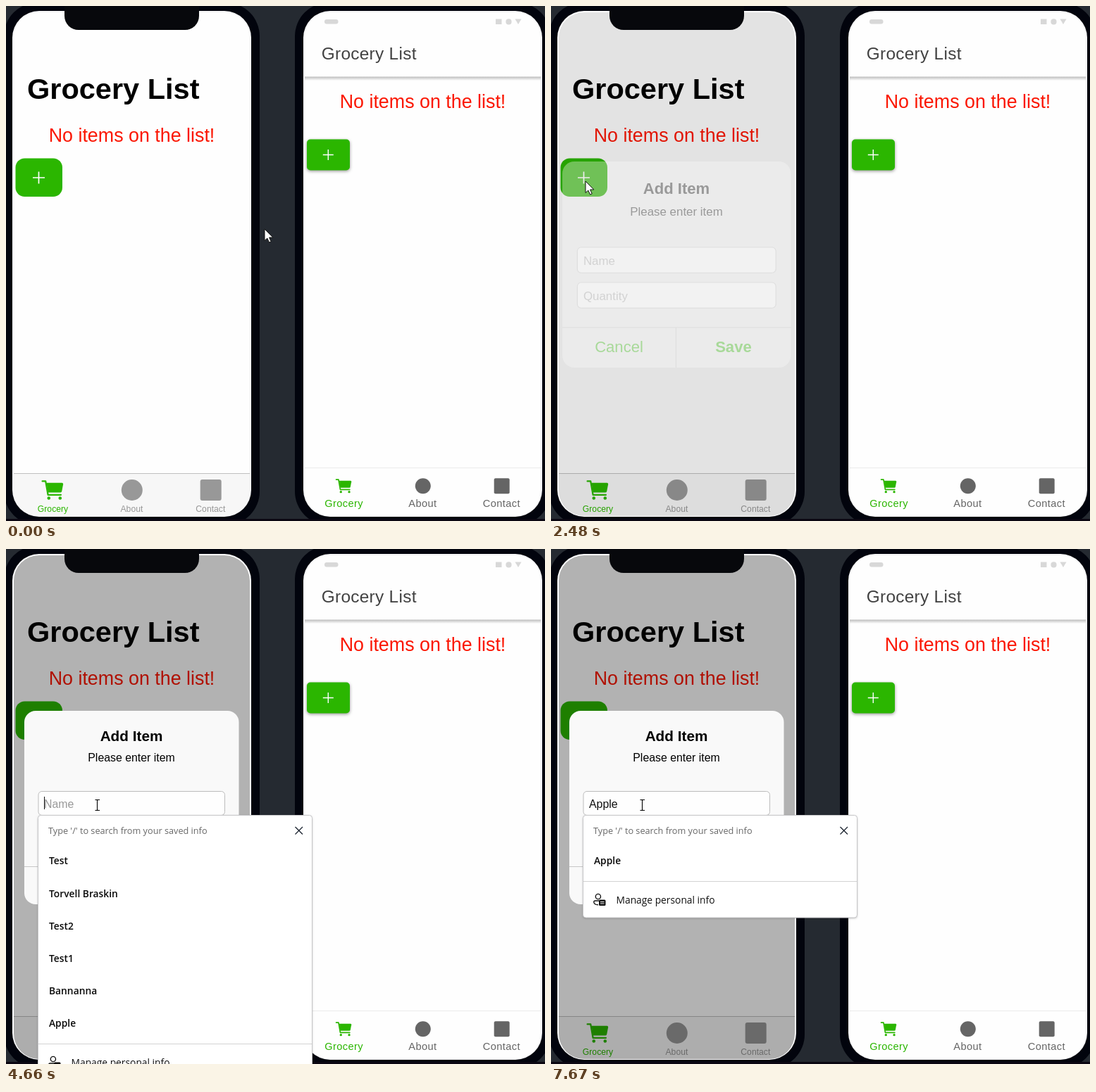
An HTML page with a canvas for the animation above (8000 ms loop, 765 by 732 pixels).

```html
<!DOCTYPE html>
<html lang="en">
<head>
<meta charset="utf-8">
<title>Grocery list on two phones</title>
<style>
html, body { margin: 0; width: 100%; height: 100%; overflow: hidden; background: #252a31; }
canvas { display: block; width: 765px; height: 732px; }
</style>
</head>
<body>
<canvas id="stage" width="765" height="732"></canvas>
<script>
const c = document.getElementById('stage').getContext('2d');
const LOOP = 8000;
const SANS = '"Liberation Sans", Arial, sans-serif';
const UI = '"Open Sans", "Noto Sans", sans-serif';
const GREEN = '#2bb600', BLUE = '#4c8dff', RED = '#fb1703';

// Pointer moves: start, end, steps, target x, target y
const MOVES = [
  [70, 190, 2, 383, 299],
  [670, 1300, 9, 54, 250.5],
  [1530, 1530, 1, 46, 242],
  [1615, 1615, 1, 39, 235],
  [1700, 1700, 1, 49, 249],
  [2870, 3180, 5, 142, 368],
  [3250, 3330, 2, 130, 364]
];
const TYPED = [4910, 5440, 5610, 5930, 6010];
const SAVED = ['Test', 'Torvell Braskin', 'Test2', 'Test1', 'Bannanna', 'Apple'];

const ease = p => p * p * p * (p * (6 * p - 15) + 10);
const between = (v, a, b) => v >= a && v < b;

function rect(x, y, w, h, r, fill, stroke) {
  c.beginPath();
  c.roundRect(x, y, w, h, r);
  if (fill) { c.fillStyle = fill; c.fill(); }
  if (stroke) { c.strokeStyle = stroke; c.lineWidth = 1; c.stroke(); }
}

function disc(x, y, r, fill) {
  c.beginPath();
  c.arc(x, y, r, 0, 7);
  c.fillStyle = fill;
  c.fill();
}

function path(d, fill, stroke, width = 1) {
  const p = new Path2D(d);
  c.lineWidth = width;
  if (fill) { c.fillStyle = fill; c.fill(p); }
  if (stroke) { c.strokeStyle = stroke; c.stroke(p); }
}

function text(s, x, y, size, fill, { weight = 400, align = 'left', gap = 0, font = SANS } = {}) {
  c.font = `${weight} ${size}px ${font}`;
  c.textAlign = align;
  c.letterSpacing = gap + 'px';
  c.fillStyle = fill;
  c.fillText(s, x, y);
}

function place(x, y, scale, draw) {
  c.save();
  c.translate(x, y);
  c.scale(scale, scale);
  draw();
  c.restore();
}

function plus(x, y, r, w) {
  path(`M${x - r} ${y}H${x + r}M${x} ${y - r}V${y + r}`, null, '#fff', w);
}

function cart(x, y, size) {
  place(x - size / 2, y - size / 2, size / 512, () => {
    c.lineJoin = c.lineCap = 'round';
    path('M48 80H112L160 352H416', null, GREEN, 32);
    path('M130 112H440Q465 115 461 141L433 285Q429 303 409 304H160Z', GREEN);
    disc(176, 416, 32, GREEN);
    disc(400, 416, 32, GREEN);
  });
}

function frame(x) {
  rect(x - 12, -5, 363, 743, 48, '#02040d');
  rect(x, 7, 339, 719, 38, '#fefefe');
}

function tabs(x, iconY, size, labelY, labelSize, gap, grey) {
  const half = size * 0.41;
  cart(x, iconY, size);
  disc(x + 112.3, iconY, half, grey);
  rect(x + 224.2 - half, iconY - half, half * 2, half * 2, size * 0.08, grey);
  ['Grocery', 'About', 'Contact'].forEach((s, i) =>
    text(s, x + i * 111.9, labelY, labelSize, i ? grey : GREEN, { align: 'center', gap }));
}

function leftPhone(hover, shade) {
  frame(9);
  c.save();
  c.beginPath();
  c.roundRect(11, 9, 335, 716, 36);
  c.clip();
  c.fillStyle = '#f7f7f7';
  c.fillRect(11, 664, 335, 62);
  c.fillStyle = '#c0c0c0';
  c.fillRect(11, 664, 335, 1);
  tabs(66.5, 688, 36.6, 719, 12.2, 0, '#989898');
  text('Grocery List', 30, 132, 41.5, '#000', { weight: 700 });
  text('No items on the list!', 178.5, 193, 26.84, RED, { align: 'center' });
  rect(13.5, 216.5, 66.5, 54.5, 13, hover ? BLUE : GREEN);
  plus(46.5, 244, 8.5, 1.7);
  c.fillStyle = `rgba(0,0,0,${shade})`;
  c.fillRect(11, 9, 335, 716);
  c.restore();
  if (!shade) rect(10.5, 8.5, 336, 717, 36, null, 'rgba(0,0,0,.05)');
  rect(83, 0, 191, 34, [0, 0, 20, 20], '#07080c');
}

function rightPhone() {
  frame(422);
  rect(423.5, 8.5, 336, 717, 36, null, 'rgba(0,0,0,.05)');
  const grey = '#d8d8d8';
  rect(452, 19, 19.5, 6.5, 3.2, grey);
  rect(695, 18.5, 8.5, 7.5, 0, grey);
  disc(713.5, 22.4, 4.1, grey);
  path('M722.5 18.5H731.5L727 26Z', grey);
  text('Grocery List', 447.7, 76, 24.4, '#424242', { gap: 0.3 });
  const g = c.createLinearGradient(0, 100, 0, 106);
  g.addColorStop(0, 'rgba(0,0,0,.3)');
  g.addColorStop(0.35, 'rgba(0,0,0,.18)');
  g.addColorStop(1, 'rgba(0,0,0,0)');
  c.fillStyle = g;
  c.fillRect(424, 100.5, 335, 5.5);
  text('No items on the list!', 591.5, 145, 26.84, RED, { align: 'center' });
  c.save();
  c.shadowColor = 'rgba(0,0,0,.4)';
  c.shadowBlur = 4;
  c.shadowOffsetY = 1.5;
  rect(427, 189.5, 61, 44, 5, GREEN);
  c.restore();
  plus(457.3, 211.5, 7.5, 1.4);
  c.fillStyle = '#ebebeb';
  c.fillRect(424, 656, 335, 1);
  tabs(479.5, 682.3, 26.84, 711.5, 14.6, 0.4, '#656565');
}

function field(y, hint, value) {
  rect(46, y, 264.5, 34, 5, '#fefefe', '#bcbcbc');
  text(value || hint, 54, y + 23, 15.86, value ? '#111' : '#999');
}

function dialog(p, value) {
  const mid = { align: 'center' }, bold = { align: 'center', weight: 700 };
  c.save();
  c.globalAlpha = p;
  place(178.25, 367.5, 1.1 - 0.1 * p, () => {
    c.translate(-178.25, -367.5);
    rect(26, 230, 304.5, 275, 16, '#f9f9f9');
    text('Add Item', 178, 273, 20.74, '#000', bold);
    text('Please enter item', 178, 302, 15.86, '#000', mid);
    field(344.5, 'Name', value);
    field(391.5, 'Quantity');
    c.fillStyle = '#c6c6c6';
    c.fillRect(26, 451, 304.5, 1);
    c.fillRect(177, 452, 1, 53);
    text('Cancel', 101.5, 484.5, 20.74, GREEN, mid);
    text('Save', 254, 484.5, 20.74, GREEN, bold);
  });
  c.restore();
}

function suggestions(items) {
  const line = 472 + (items.length - 1) * 46.2;
  c.save();
  c.shadowColor = 'rgba(0,0,0,.25)';
  c.shadowBlur = 3;
  c.shadowOffsetY = 1;
  rect(45.5, 378.5, 389, line - 326.5, 4, '#fff');
  c.restore();
  rect(45.5, 378.5, 389, line - 326.5, 4, null, '#c6c6c8');
  text("Type '/' to search from your saved info", 60, 405, 12.7, '#686868', { font: UI });
  path('M410.5 395L421 405.5M421 395L410.5 405.5', null, '#1c2430', 1.3);
  items.forEach((s, i) => text(s, 61, 448.3 + i * 46.2, 13.8, '#0a0a0a', { font: UI, weight: 600 }));
  c.fillStyle = '#d2d2d2';
  c.fillRect(46, Math.round(line), 388, 1);
  place(60, line + 18, 1, () => {
    path('M10.5 4A3.6 3.6 0 1 1 3.3 4A3.6 3.6 0 1 1 10.5 4M8 10H2.5Q.8 10 .8 12Q1.2 15.5 7 15.8', null, '#111', 1.4);
    rect(8, 8.5, 9.5, 8.5, 1.5, '#111');
    path('M10 11.5H15.5M10 14H15.5', null, '#fff', 1.1);
  });
  text('Manage personal info', 92.5, line + 32.3, 13.8, '#111', { font: UI });
}

function pointerAt(t) {
  let x = 367, y = 317;
  for (const [a, b, n, tx, ty] of MOVES) {
    if (t < a) break;
    const gap = (b - a) / (n - 1) || 1;
    const k = Math.min(n, 1 + Math.floor((t - a) / gap + 0.1));
    const p = ease(k / n);
    x += (tx - x) * p;
    y += (ty - y) * p;
  }
  return [x, y];
}

function pointer(x, y, kind) {
  place(x, y, 1, () => {
    c.lineJoin = 'round';
    c.lineCap = 'butt';
    if (kind === 'hand') {
      path('M-2 1.5Q0-1 2 1.5V7Q4 5.8 5 7.8Q7 6.8 8 8.8Q10.5 8 10.5 11V15L8.5 18.5V21.5H-1V18.5L-5 13Q-5.6 10-3.5 10.6L-2 12.5Z', '#fff', '#000', 1.1);
      path('M2 7V11M5 8V11.5M8 9V12', null, '#000', 0.9);
    } else if (kind === 'beam') {
      path('M-3.5-7.5H-1L-.5-7L0-7.5H3M-3.5 7.5H-1L-.5 7L0 7.5H3M-.5-7V7', null, '#000', 1.1);
    } else {
      path('M0 0V16.5L3.8 13L6.5 19L9.2 17.8L6.6 12H11.8Z', '#fff', '#111');
    }
  });
}

function render(t) {
  const [x, y] = pointerAt(t);
  const open = t < 2390 ? 0 : t < 2480 ? 0.01 : t < 2560 ? 0.35 : t < 2630 ? 0.93 : 1;
  const hover = !open && between(x, 14, 80) && between(y, 217, 271);
  const value = 'Apple'.slice(0, TYPED.filter(k => t >= k).length);

  c.fillStyle = '#252a31';
  c.fillRect(0, 0, 765, 732);
  leftPhone(hover, 0.3 * open);
  rightPhone();
  c.fillStyle = '#0b0712';
  c.fillRect(0, 729, 765, 3);

  if (open) dialog(open, value);
  const caret = t >= 3570 && !between(t, 4130, 4660) && !between(t, 6560, 7270) && t < 7670;
  if (caret) {
    c.font = `15.86px ${SANS}`;
    c.letterSpacing = '0px';
    c.fillStyle = '#111';
    c.fillRect(Math.floor(54 + c.measureText(value).width), 352, 1, 18);
  }
  if (t >= 3650) suggestions(value ? ['Apple'] : SAVED);

  const inField = open === 1 && between(x, 46, 311) && between(y, 344, 379);
  pointer(x, y, hover ? 'hand' : inField ? 'beam' : 'arrow');
}

function tick() {
  render(performance.now() % LOOP);
  requestAnimationFrame(tick);
}
tick();
</script>
</body>
</html>
```
